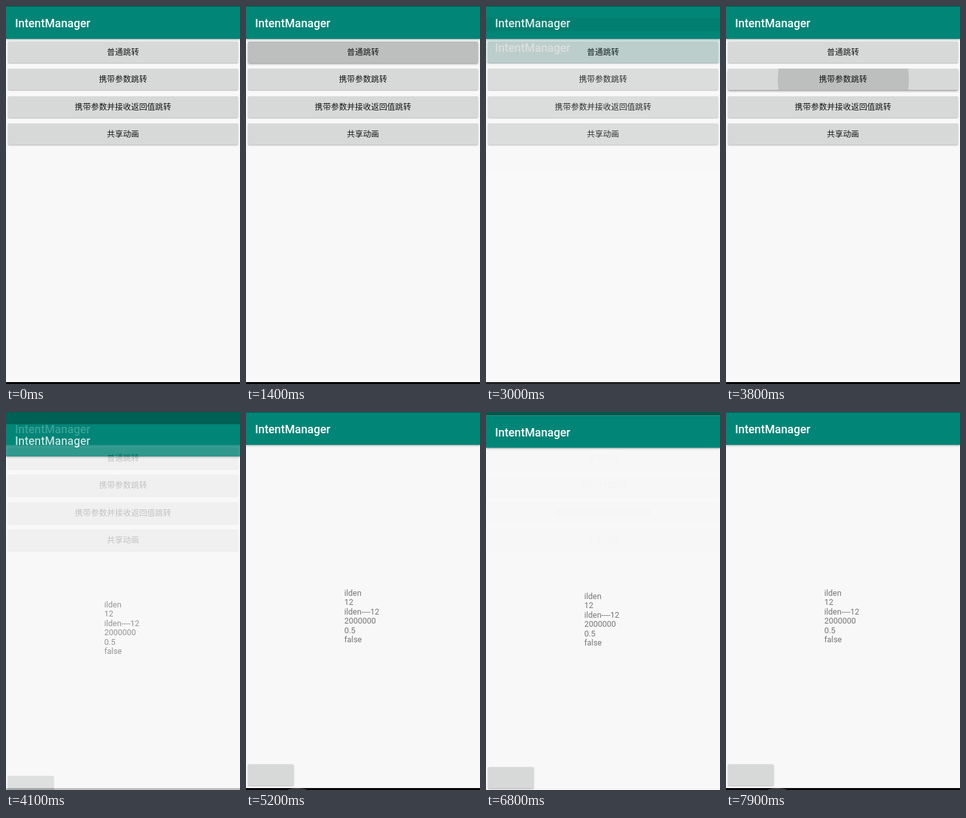
Write an HTML page that moves like this. It is 363 px wide and 586 px high and loops after 8000 ms.

```html
<!DOCTYPE html>
<html lang="zh-CN">
<head>
<meta charset="utf-8">
<title>IntentManager</title>
<style>
html, body { margin: 0; width: 100%; height: 100%; overflow: hidden; background: #f8f8f8; }
#stage { position: absolute; left: 0; top: 0; width: 363px; height: 586px; overflow: hidden; }
.page { position: absolute; left: 0; top: -20px; width: 363px; height: 606px; background: #f8f8f8; overflow: hidden; }
.page > * { position: absolute; box-sizing: border-box; }
.status { left: 0; top: 0; width: 363px; height: 21px; background: #00574b; z-index: 1; }
.bar {
  left: 0; top: 21px; width: 363px; height: 50px; padding-left: 14px;
  background: #008577; color: #fff; box-shadow: 0 1px 3px rgba(0, 0, 0, .35);
  font: 500 17.8px/51px Roboto, sans-serif;
}
.nav { left: 0; top: 603px; width: 363px; height: 3px; background: #000; overflow: hidden; }
.nav i {
  position: absolute; left: 56px; top: 0; width: 47px; height: 20px;
  border-radius: 50%; background: #3a3a3a; visibility: hidden;
}
.btn {
  left: 3px; width: 357px; height: 33px; border-radius: 2px; overflow: hidden;
  background: #d7d9d8; color: #151515; text-align: center;
  box-shadow: 0 1px 2px rgba(0, 0, 0, .28);
  font: 12.46px/33px "Noto Sans CJK SC", "Noto Sans CJK", sans-serif;
}
.btn.down { box-shadow: 0 2px 3px rgba(0, 0, 0, .35); }
.btn i {
  position: absolute; left: 50%; top: 50%; width: 370px; height: 370px; margin: -185px;
  border-radius: 50%; background: rgba(0, 0, 0, .12); transform: scale(0);
}
.data {
  left: 152.5px; top: 293.7px; color: #757575; white-space: pre;
  font: 12.46px/14.5px Roboto, sans-serif;
}
</style>
</head>
<body>
<div id="stage"></div>
<script>
const LOOP = 8000, STEP = 100, RISE = 47;
const stage = document.getElementById('stage');

function makePage(content, color) {
  const page = document.createElement('div');
  page.className = 'page';
  page.style.background = color;
  page.innerHTML = '<div class="status"></div><div class="bar">IntentManager</div>' +
    content + '<div class="nav"><i></i></div>';
  return stage.appendChild(page);
}

const labels = ['普通跳转', '携带参数跳转', '携带参数并接收返回值跳转', '共享动画'];
const lines = ['ilden', '12', 'ilden----12', '2000000', '0.5', 'false'];

const home = makePage(labels.map((text, i) =>
  `<div class="btn" style="top:${Math.round(75 + i * 42.35)}px">${text}<i></i></div>`).join(''), '#f8f8f8');
const blank = makePage('', '#fafafa');
const detail = makePage(`<div class="data">${lines.join('\n')}</div>` +
  '<div class="btn" style="top:566px;width:71px"></div>', '#f8f8f8');
const buttons = home.querySelectorAll('.btn');

// press: finger on a button, open/close: window transitions, back: navigation ripple
const visits = [
  { page: blank, button: 0, press: 1300, open: 1469, back: 2700, close: 2763 },
  { page: detail, button: 1, press: 3800, open: 4039, back: 5100, close: 5263 },
  { page: detail, button: 1, press: 6600, open: 6669, back: 7900, close: 9000 }
];

const clamp = x => Math.min(1, Math.max(0, x));
const half = x => Math.round(x * 2) / 2;

function place(page, y, alpha) {
  page.style.visibility = 'visible';
  page.style.transform = `translateY(${half(y)}px)`;
  page.style.opacity = alpha;
}

function press(button, age) {
  button.classList.add('down');
  button.lastChild.style.transform = `scale(${clamp(.55 + age / 200)})`;
}

function render(t) {
  for (const page of [blank, detail]) page.style.visibility = 'hidden';
  for (const b of buttons) {
    b.classList.remove('down');
    b.lastChild.style.transform = 'scale(0)';
  }
  for (const v of visits) {
    const opened = t - v.open, closed = t - v.close;
    if (t >= v.press && opened < 0) press(buttons[v.button], t - v.press);
    if (opened < 0 || closed >= 250) continue;
    if (closed < 0) {
      place(v.page, RISE * (1 - clamp(opened / 350)) ** 5, 1 - (1 - clamp(opened / 200)) ** 4);
    } else {
      place(v.page, RISE * (closed / 250) ** 4, 1 - clamp((closed - 100) / 156));
    }
    v.page.querySelector('.nav i').style.visibility = t >= v.back ? 'inherit' : 'hidden';
  }
}

function tick() {
  const t = performance.now() % LOOP;
  render(Math.floor(t / STEP) * STEP);
  requestAnimationFrame(tick);
}
tick();
</script>
</body>
</html>
```
